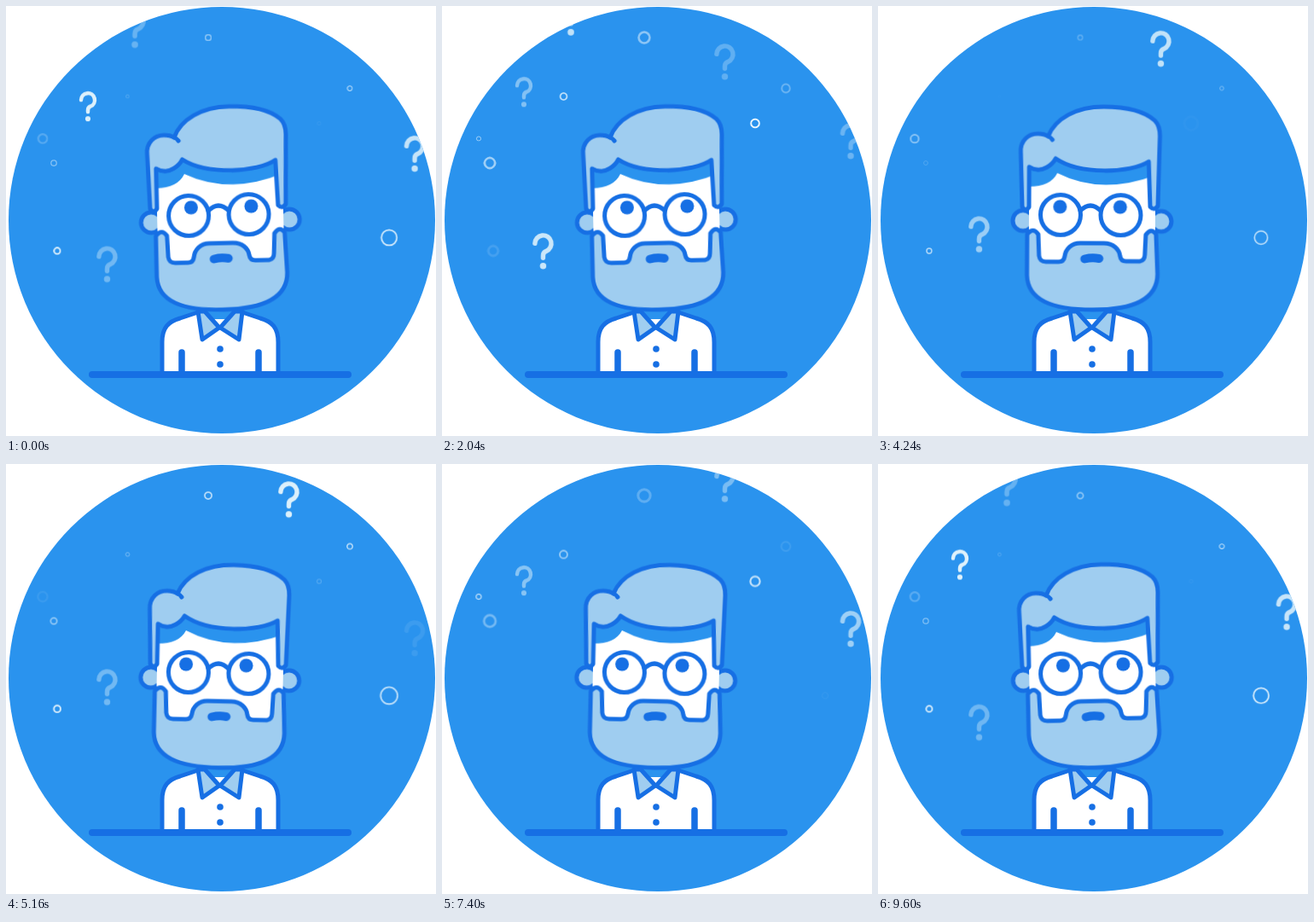
Recreate the animation shown at these times as an HTML page. Size 504 by 504 pixels, loop 9.64 s.

```html
<!DOCTYPE html>
<html lang="en">
<head>
<meta charset="utf-8">
<title>Wondering</title>
<style>
  :root { --bg: #2a93ee; --line: #166fe4; --soft: #9fcdf0; --loop: 9.64s; }
  html, body { margin: 0; width: 100%; height: 100%; overflow: hidden; background: #fff; }
  svg { display: block; width: 100vw; height: 100vh; }

  .ink { stroke: var(--line); stroke-width: 5; stroke-linecap: round; stroke-linejoin: round; }
  .soft { fill: var(--soft); }
  .white { fill: #fff; }
  .bg { fill: var(--bg); }
  .dark { fill: var(--line); }
  .none { fill: none; }

  .head { transform-origin: 249px 240px; animation: tilt var(--loop) ease-in-out infinite; }
  .pupils { animation: look var(--loop) ease-in-out infinite; }
  @keyframes tilt {
    0%, 32.2%, 99.6%, 100% { transform: rotate(-1.3deg); }
    52.9%, 77.8% { transform: rotate(1.3deg); }
  }
  @keyframes look {
    0%, 33%, 99.6%, 100% { transform: translateX(3px); }
    52.5%, 82% { transform: translateX(-3px); }
  }

  .mark { animation: rise var(--loop) infinite, blink-q var(--loop) linear infinite; }
  .mark path { fill: none; stroke: #e4f4fb; stroke-width: 4.5; stroke-linecap: round; }
  .mark circle { fill: #e4f4fb; }
  @keyframes rise {
    0% { transform: translateY(25px); animation-timing-function: cubic-bezier(.364, 0, .636, 1); }
    87.14%, 100% { transform: translateY(-25px); }
  }
  @keyframes blink-q {
    0%, 87.14%, 100% { opacity: 0; }
    43.57% { opacity: 1; }
  }

  .ring { fill: none; stroke: #eef8fd; animation: grow 4.82s linear infinite; }
  @keyframes grow {
    0% { transform: scale(.22); opacity: 0; }
    46.68% { transform: scale(.61); opacity: 1; }
    93.36%, 100% { transform: scale(1); opacity: 0; }
  }
</style>
</head>
<body>
<svg viewBox="0 0 504 504">
  <clipPath id="disc"><circle cx="253" cy="251" r="250"/></clipPath>
  <circle class="bg" cx="253" cy="251" r="250"/>
  <g id="sky" clip-path="url(#disc)"></g>

  <g class="ink">
    <path class="white" d="M183 429V394C183 377 190 370 204 366L225 359H277L298 366C312 370 319 377 319 394V429"/>
    <path class="bg" stroke="none" d="M230 350H272L262 367H240Z"/>
    <path class="soft" d="M225 358L230 391L250 377L233 358Z"/>
    <path class="soft" d="M277 358L273 391L251 377L268 358Z"/>
    <path class="none" stroke-width="7" style="stroke-width:7.5" d="M206 406V428M296 406V428"/>
  </g>
  <circle class="dark" cx="251" cy="402" r="3.8"/>
  <circle class="dark" cx="251" cy="420" r="3.8"/>
  <path class="ink" style="stroke-width:8" d="M101 432H401"/>

  <g class="head">
    <g class="ink soft">
      <circle cx="170" cy="252" r="12"/>
      <circle cx="332" cy="252" r="12"/>
    </g>
    <path class="white" d="M177 185H325V305H177Z"/>
    <path class="bg" d="M177 183V212Q202 212 210 196Q262 222 325 198V178Z"/>
    <g class="ink">
      <path class="soft" d="M175 268Q182 259 188 268L189 293Q190 300 197 300H212Q218 300 219 294C220 285 227 278 237 278H265C276 278 283 285 284 293Q285 299 291 299H307Q313 298 313 291L314 268Q320 259 326 267L328 314C328 344 300 356 252 356C204 356 176 345 175 316Z"/>
      <path class="soft" d="M169 236L167 172C166 158 176 150 187 150C192 150 196 151 199 153C207 132 232 118 264 118C293 118 313 124 324 134C329 139 330 145 330 152L328 234Q324 240 319 235L317 182C296 196 236 198 208 179C203 188 193 193 186 192C181 192 179 190 177 189V236Q173 242 169 236Z"/>
      <path class="none" d="M199 153Q202 154 204 157"/>
      <path class="none" style="stroke-width:10" d="M242.5 296.5Q251 294.5 259.5 296"/>
      <circle class="white" cx="214" cy="245" r="23.5"/>
      <circle class="white" cx="284.5" cy="245" r="23.5"/>
      <path class="none" d="M237 240Q249 228 261 240"/>
    </g>
    <g class="pupils dark">
      <circle cx="214" cy="235.5" r="8"/>
      <circle cx="284.5" cy="235.5" r="8"/>
    </g>
  </g>
</svg>
<script>
  // x, y, scale, time of full brightness (s)
  const marks = [
    [96, 133.5, 1, -0.14],
    [118.5, 299.5, 1.2, 2.6],
    [331.5, 60.5, 1.2, 5],
    [479, 197, 1.2, 8.95],
    [151, 23.5, 1.25, 2.81]
  ];
  // x, y, final radius, stroke, time of full brightness (s)
  const rings = [
    [237, 37, 8, 3.4, 0.93],
    [142.5, 106, 5.7, 2.4, 1.6],
    [403, 96.5, 5.6, 2.2, 0.57],
    [367, 137.5, 8, 3.2, 2.05],
    [56, 184, 8, 3.2, 1.2],
    [43, 155.5, 5.8, 2.4, 3.1],
    [60, 287, 6, 3, 0.1],
    [449, 271.5, 14, 2.7, 4.6]
  ];

  const delay = (peak, half, loop) => `animation-delay:${peak - half - loop}s`;

  const drawMark = ([x, y, k, peak]) => `
    <g transform="translate(${x} ${y})"><g class="mark" style="${delay(peak, 4.2, 9.64)}">
      <g transform="scale(${k})">
        <path d="M-8 -22A8 8 0 1 1 3 -14.5Q0 -13.5 0 -10V-8"/><circle r="3.1"/>
      </g>
    </g></g>`;

  const drawRing = ([x, y, r, w, peak]) => `
    <g transform="translate(${x} ${y})">
      <circle class="ring" r="${r}" stroke-width="${w}" style="${delay(peak, 2.25, 4.82)}"/>
    </g>`;

  document.getElementById('sky').innerHTML =
    rings.map(drawRing).join('') + marks.map(drawMark).join('');
</script>
</body>
</html>
```
